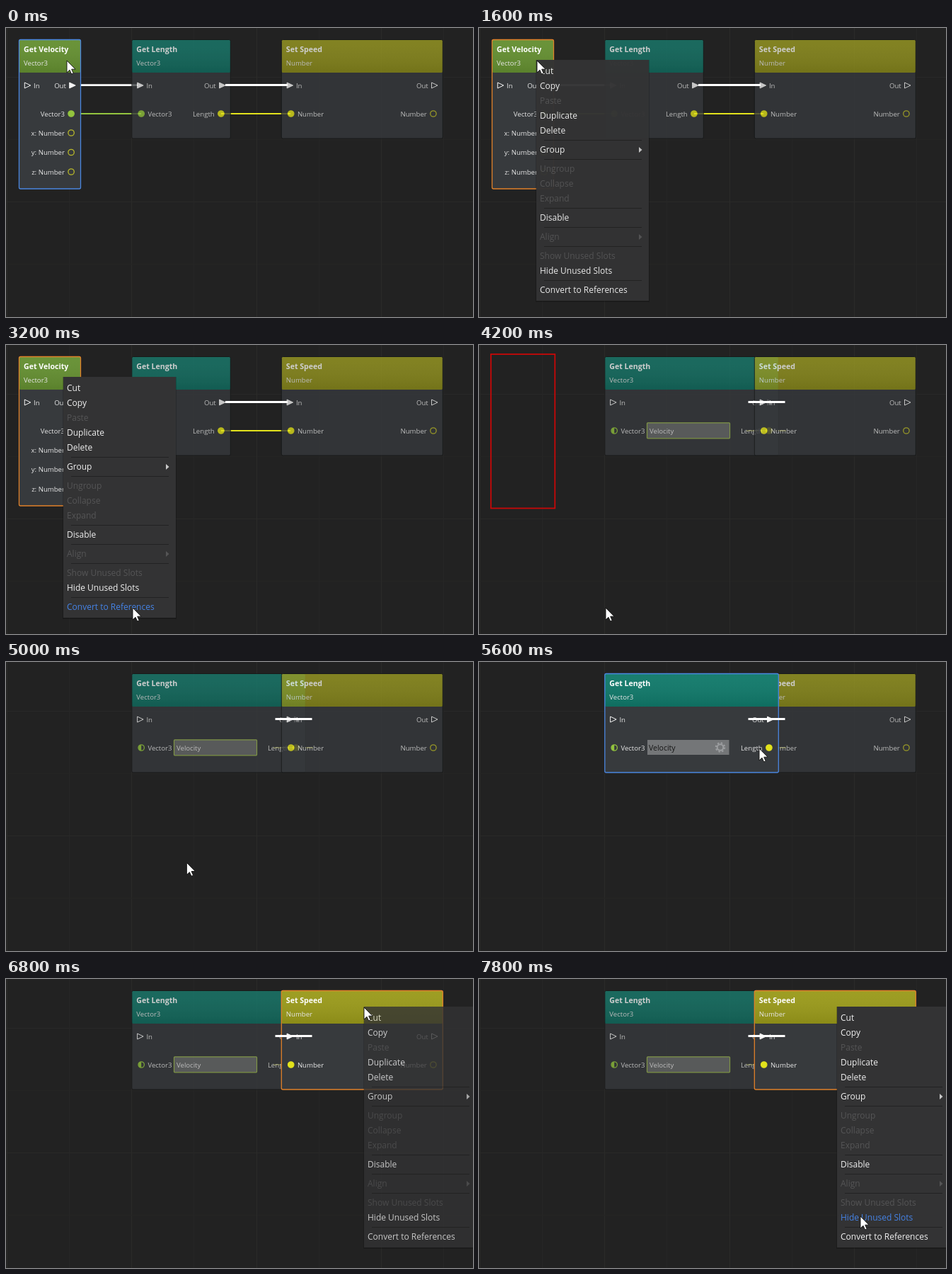
An HTML page that plays this animation: 660x408 px, repeating every 8000 ms.

```html
<!DOCTYPE html>
<html lang="en">
<head>
<meta charset="utf-8">
<title>Convert to references</title>
<style>
  html, body { margin: 0; width: 100%; height: 100%; overflow: hidden; background: #222; }
  svg { display: block; width: 660px; height: 408px; font: 9.6px "Open Sans", sans-serif; }
  .title { font-size: 10.6px; font-weight: 700; fill: #fff; }
  .label { fill: #e6e6e6; }
  .menu { font-size: 12px; fill: #f0f0f0; }
  .menu .off { fill: #555556; }
  .menu .hot { fill: #4583e6; }
</style>
</head>
<body>
<svg viewBox="0 0 660 408">
  <defs>
    <linearGradient id="shade" x2="0" y2="1">
      <stop stop-color="#fff" stop-opacity=".04"/>
      <stop offset="1" stop-color="#000" stop-opacity=".1"/>
    </linearGradient>
  </defs>
  <g id="grid" shape-rendering="crispEdges"></g>
  <g id="scene"></g>
  <path id="cursor" d="M0 0V17L4 13.3 6.6 19 9.2 17.9 6.7 12.2H12Z" fill="#fff" stroke="#111" stroke-width=".9"/>
</svg>
<script>
const LOOP = 8000, STEP = 200;
const WHITE = '#f4f4f4', YELLOW = '#e2e21c', GREEN = '#93c43e', RING = '#b9b92a';
const BLUE = '#4a86e0', ORANGE = '#e0812a';
const IDLE_OPACITY = 0.78;
const byId = id => document.getElementById(id);

const text = (x, y, s, cls = 'label', anchor = 'start') =>
  `<text x="${x}" y="${y}" class="${cls}" text-anchor="${anchor}">${s}</text>`;
const rect = (x, y, w, h, attrs) =>
  `<rect x="${x}" y="${y}" width="${w}" height="${h}" ${attrs}/>`;
const line = (x1, x2, y, color, width) =>
  `<path d="M${x1} ${y}H${x2}" stroke="${color}" stroke-width="${width}"/>`;

// Port shapes: flow triangles or data circles, filled, hollow or half filled.
function portIcon(kind, x, y, fill, color) {
  if (kind === 'flow') {
    return `<path d="M${x - 4} ${y - 4}L${x + 4.5} ${y}L${x - 4} ${y + 4}Z" stroke="${WHITE}"
      fill="${fill === 'full' ? WHITE : 'none'}"/>`;
  }
  const ring = `<circle cx="${x}" cy="${y}" r="4.2" stroke="${color}" stroke-width="1.3"
    fill="${fill === 'full' ? color : 'none'}"/>`;
  return fill === 'half'
    ? ring + `<path d="M${x} ${y - 4}a4 4 0 0 0 0 8Z" fill="${color}"/>` : ring;
}

function port(node, [side, kind, label, y, fill, color]) {
  const [iconGap, textGap] = kind === 'flow' ? [11.8, 20.6] : [13.4, 22.6];
  const left = side === 'in';
  const at = gap => left ? node.x + gap : node.x + node.w - gap;
  return portIcon(kind, at(iconGap), y, fill, color) +
    text(at(textGap), y + 3.6, label, 'label', left ? 'start' : 'end');
}

function gear(x, y) {
  return `<g fill="none" stroke="#9c9ea0"><circle cx="${x}" cy="${y}" r="4.3" stroke-width="2"/>
    <circle cx="${x}" cy="${y}" r="6.2" stroke-width="2" stroke-dasharray="2.4 2.47"/></g>`;
}

function reference(active) {
  return active
    ? rect(238, 110, 115.5, 21, 'fill="#747678"') + gear(341, 120.5) +
      `<text x="240" y="125" font-size="10.5" fill="#151515">Velocity</text>`
    : rect(237.5, 109.8, 117, 22, 'rx="1" fill="#686a6a" stroke="#98b450" stroke-width="1.2"') +
      text(241, 124.5, 'Velocity');
}

function drawNode(node, border) {
  const { x, w, h, color, title, type, ports, extra } = node;
  return `<g opacity="${border ? 1 : IDLE_OPACITY}">` +
    rect(x, 16.5, w, h, 'rx="2" fill="#373a3d"') +
    rect(x, 16.5, w, 46.5, `rx="2" fill="${color}"`) +
    rect(x, 16.5, w, 46.5, 'rx="2" fill="url(#shade)"') +
    text(x + 6.5, 34.3, title, 'title') + text(x + 6.5, 53, type) +
    ports.map(p => port(node, p)).join('') + (extra ? extra(!!border) : '') +
    rect(x, 16.5, w, h, `rx="2" fill="none" stroke="${border || '#161818'}" stroke-width="${border ? 1.3 : 1}"`) +
    '</g>';
}

const velocity = {
  x: 18.5, w: 87, h: 210.5, color: '#648f31', title: 'Get Velocity', type: 'Vector3',
  ports: [
    ['in', 'flow', 'In', 81], ['out', 'flow', 'Out', 81, 'full'],
    ['out', 'data', 'Vector3', 121, 'full', GREEN],
    ...['x', 'y', 'z'].map((axis, i) => ['out', 'data', axis + ': Number', 148 + i * 27.5, '', RING])
  ]
};
const lengthNode = converted => ({
  x: 177.8, w: converted ? 245.5 : 139.5, h: 139.5, color: '#10796a', title: 'Get Length', type: 'Vector3',
  ports: [
    ['in', 'flow', 'In', 81, converted ? '' : 'full'], ['out', 'flow', 'Out', 81, 'full'],
    ['in', 'data', 'Vector3', 121, converted ? 'half' : 'full', GREEN],
    ['out', 'data', 'Length', 121, 'full', YELLOW]
  ],
  extra: converted ? reference : null
});
const speed = {
  x: 389.3, w: 228, h: 139.5, color: '#9a9a1a', title: 'Set Speed', type: 'Number',
  ports: [
    ['in', 'flow', 'In', 81, 'full'], ['out', 'flow', 'Out', 81],
    ['in', 'data', 'Number', 121, 'full', YELLOW], ['out', 'data', 'Number', 121, '', RING]
  ]
};

// Groups are divided by separators; "-" marks a disabled entry, ">" a submenu.
const MENU = ['Cut,Copy,-Paste,Duplicate,Delete', 'Group>', '-Ungroup,-Collapse,-Expand',
  'Disable', '-Align>', '-Show Unused Slots,Hide Unused Slots', 'Convert to References'];

function drawMenu(x, y, opacity, pointer) {
  let out = '', row = y + 16;
  MENU.forEach((group, i) => {
    if (i) {
      out += line(x + 11, x + 149, row - 7.5, '#222223', 1);
      row += 6;
    }
    for (const item of group.split(',')) {
      const off = item[0] === '-', hot = !off && Math.abs(pointer.y - row) < 10;
      out += text(x + 5, row + 4.3, item.replace(/[->]/g, ''), off ? 'off' : hot ? 'hot' : '');
      if (item.endsWith('>')) {
        out += `<path d="M${x + 145} ${row - 4}l4.5 4-4.5 4Z" fill="${off ? '#555556' : '#c8c8c8'}"/>`;
      }
      row += 21;
    }
  });
  return `<g class="menu" opacity="${opacity}">` +
    rect(x - 1, y, 161, 342, 'fill="#000" opacity=".2"') +
    rect(x, y, 159, 340, 'fill="#333334"') + out + '</g>';
}

const PATH = [[0, 86, 46], [400, 82, 46], [1800, 82, 46], [3200, 179, 371], [4600, 179, 371],
  [5600, 396, 122], [6200, 506, 40], [7000, 506, 40], [7800, 539, 335], [LOOP, 539, 335]];

function pointerAt(t) {
  const i = PATH.findIndex(p => p[0] > t);
  const [t0, x0, y0] = PATH[i - 1], [t1, x1, y1] = PATH[i];
  const u = (t - t0) / (t1 - t0), k = u * u * (3 - 2 * u);
  return { x: x0 + (x1 - x0) * k, y: y0 + (y1 - y0) * k };
}

function before(t, pointer) {
  const menuOpen = t >= 1600, len = lengthNode(false);
  return line(97, 186, 80.6, '#fff', 2.6) + line(92, 191, 121, GREEN, 2) + line(304, 402, 121, YELLOW, 2) +
    drawNode(len) + drawNode(speed) + drawNode(velocity, menuOpen ? ORANGE : BLUE) +
    line(310, 398, 80.6, '#fff', 3) +
    (menuOpen ? drawMenu(81, 45, t < 1800 ? 0.97 : 1, pointer) : '');
}

function after(t, pointer) {
  const menuOpen = t >= 6800, len = lengthNode(true);
  const overLength = t >= 5400 && t < 5800;
  const speedNode = drawNode(speed, menuOpen ? ORANGE : t >= 5800 ? BLUE : '');
  const lenNode = drawNode(len, overLength ? BLUE : '');
  return line(378, 434, 121, YELLOW, 1.5) +
    (overLength ? speedNode + lenNode : lenNode + speedNode) +
    line(380.5, 432.5, 80.6, '#fff', 3) +
    (t < 4400 ? rect(16.8, 13, 90.5, 217.5, 'fill="none" stroke="#c80808" stroke-width="1.8"') : '') +
    (menuOpen ? drawMenu(506, 39, t < 7000 ? 0.8 : 1, pointer) : '');
}

for (let i = 0; i < 8; i++) {
  const x = Math.round(0.5 + i * 88.25), y = 69 + i * 88;
  byId('grid').innerHTML +=
    rect(x, 0, 1, 408, `fill="${i % 2 ? '#262626' : '#2a2a29'}"`) +
    rect(0, y, 660, 1, `fill="${i % 2 ? '#252524' : '#292928'}"`);
}

const start = performance.now();
let shown = -1;
function frame() {
  const t = Math.floor((performance.now() - start) % LOOP / STEP) * STEP;
  if (t !== shown) {
    shown = t;
    const pointer = pointerAt(t);
    byId('scene').innerHTML = t < 4200 ? before(t, pointer) : after(t, pointer);
    byId('cursor').setAttribute('transform', `translate(${pointer.x} ${pointer.y})`);
  }
  requestAnimationFrame(frame);
}
frame();
</script>
</body>
</html>
```
